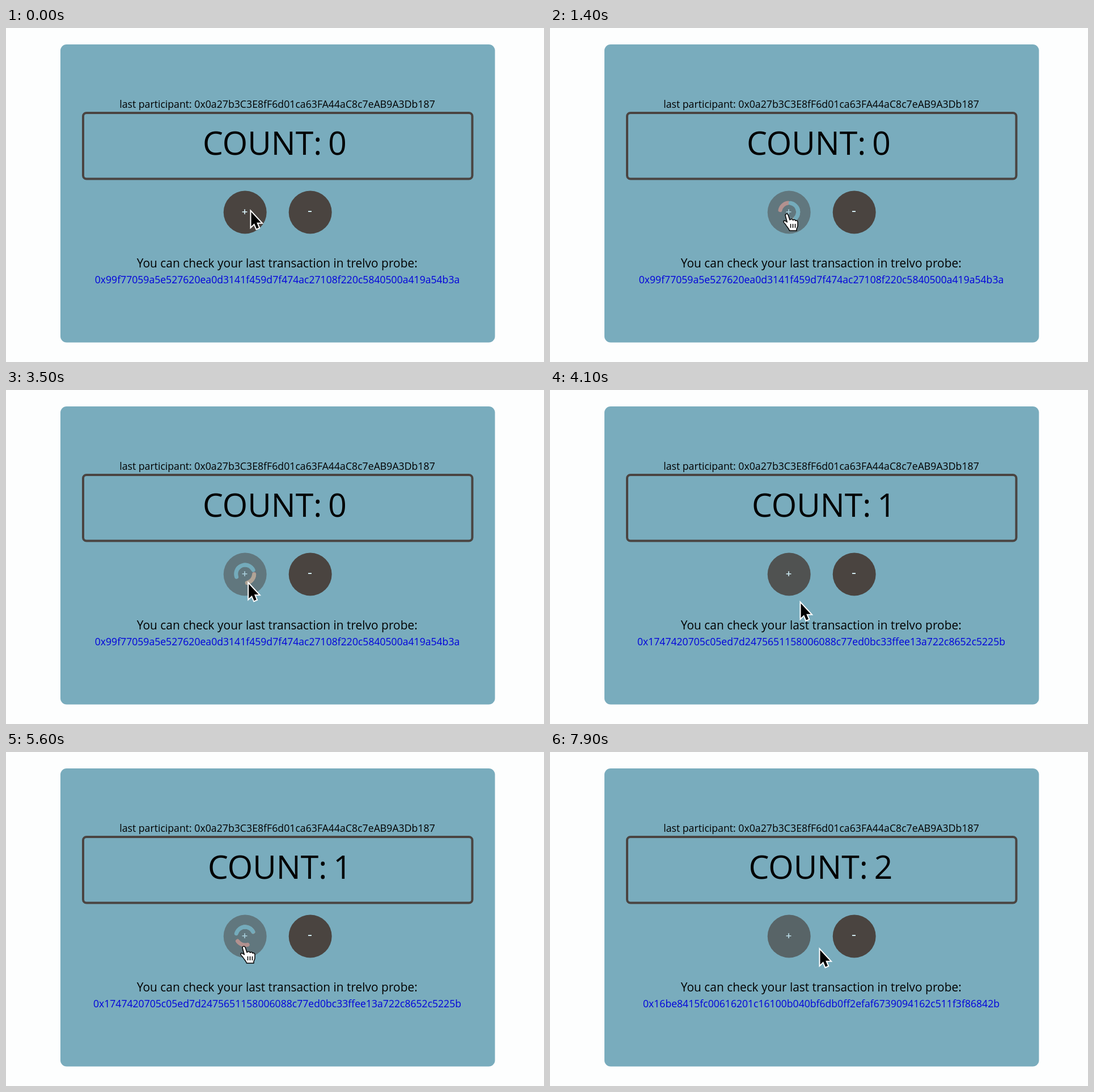
An HTML page for the animation above (8000 ms loop, 949x590 px).

```html
<!DOCTYPE html>
<html lang="en">
<head>
<meta charset="utf-8">
<title>Counter</title>
<style>
  html, body { margin: 0; width: 100%; height: 100%; overflow: hidden; background: #fdfefe; }
  svg { display: block; width: 100vw; height: 100vh; }
  text { font-family: "Open Sans", "Noto Sans", sans-serif; text-anchor: middle; }
  #count { text-anchor: start; word-spacing: -4px; }
  .sign { fill: #d9f3fa; }
  .arc { fill: none; stroke-width: 7; stroke-linecap: round; }
</style>
</head>
<body>
<svg viewBox="0 0 949 590" preserveAspectRatio="none">
  <rect x="96" y="29" width="766.5" height="526.5" rx="11" fill="#79acbd"/>
  <text x="478.5" y="141" font-size="17.7">last participant: 0x0a27b3C3E8fF6d01ca63FA44aC8c7eAB9A3Db187</text>
  <rect x="136" y="150" width="686.5" height="116.5" rx="6" fill="none" stroke="#4a4441" stroke-width="4"/>
  <text id="count" y="224" font-size="57"></text>

  <g id="plus">
    <circle cx="421.7" cy="325.5" r="38" fill="#4a4440"/>
    <text class="sign" x="421" y="331" font-size="18.5" font-weight="600">+</text>
  </g>
  <circle cx="536.7" cy="325.5" r="38" fill="#4a4440"/>
  <text class="sign" x="536" y="330.5" font-size="25">-</text>
  <g id="spinner" transform="translate(421.7 325)"></g>

  <text x="478.3" y="422.5" font-size="20.9">You can check your last transaction in trelvo probe:</text>
  <text id="hash" x="478.5" y="451" font-size="17.6" fill="#0000dc"></text>

  <g id="cursor">
    <path id="arrow" d="M.5 0V25.5L6 20.3L10 29.5L14 27.7L10.2 18.7H17.8Z"
      fill="#000" stroke="#fff" stroke-width="4" paint-order="stroke"/>
    <g id="hand" stroke="#000" stroke-width="1.5" stroke-linejoin="round">
      <path fill="#fff" d="M-2.8 3.5C-3.5 0 1 -1 2.2 2.5L5 11C7 9 10 9 10.5 11.5C12 9.8 15 10 15 12.5C17 11.5 19 12.5 19 15V21C19 24 17.5 25 17 27V30H4.5C3.5 26-.5 23-2.5 19C-4.5 17-7 15-5.8 13C-4.5 11.5-1.5 13 .3 15Z"/>
      <path d="M6.5 18v7M10.5 18v7M14.5 18v7"/>
    </g>
  </g>
</svg>
<script>
const LOOP = 8000, STEP = 100;
const PINK = '#b2918f', ORANGE = '#b0a496', TEAL = '#74abbb';
const $ = id => document.getElementById(id);

const states = [
  { from: 0, count: 0, x: 347, hash: '0x99f77059a5e527620ea0d3141f459d7f474ac27108f220c5840500a419a54b3a' },
  { from: 3900, count: 1, x: 356, hash: '0x1747420705c05ed7d2475651158006088c77ed0bc33ffee13a722c8652c5225b' },
  { from: 7800, count: 2, x: 350.5, hash: '0x16be8415fc00616201c16100b040bf6db0ff2efaf6739094162c511f3f86842b' }
];

// arcs: colour, angle at time "ref", degrees per second
const loads = [
  { begin: 800, end: 3900, ref: 1400, arcs: [
    [PINK, 228, 252], [ORANGE, 18, 354], [TEAL, 315, 458], [TEAL, 5, 631], [TEAL, 10, 823]] },
  { begin: 4500, end: 7800, ref: 4800, arcs: [
    [PINK, 180, 362], [ORANGE, 325, 415], [TEAL, 260, 415], [TEAL, 120, 670], [TEAL, 118, 642]] }
];

// time, x, y of the pointer's tip
const path = [
  [0, 432, 325], [400, 418, 328], [2200, 418, 328], [2600, 420, 324], [3300, 420, 324],
  [3800, 442, 377], [4200, 442, 377], [4600, 420, 343], [7200, 420, 343], [7900, 476, 350], [8000, 476, 350]
];
const handTimes = [[300, 2300], [4400, 7600]];

const arcs = loads[0].arcs.map(() => {
  const arc = document.createElementNS('http://www.w3.org/2000/svg', 'path');
  const c = 16 * Math.cos(Math.PI / 5), s = 16 * Math.sin(Math.PI / 5);
  arc.setAttribute('d', `M${c} ${-s}A16 16 0 0 1 ${c} ${s}`);
  arc.setAttribute('class', 'arc');
  return $('spinner').appendChild(arc);
});

const clamp = v => Math.max(0, Math.min(1, v));
const ease = v => v * v * (3 - 2 * v);

function pointerAt(t) {
  const i = Math.max(1, path.findIndex(p => p[0] > t));
  const [a, b] = [path[i - 1], path[i]];
  const k = ease(clamp((t - a[0]) / (b[0] - a[0])));
  return [a[1] + (b[1] - a[1]) * k, a[2] + (b[2] - a[2]) * k];
}

function buttonOpacity(t) {
  return loads.reduce((o, { begin, end }) => {
    if (t < begin) return o;
    return t < end ? 1 - 0.5 * clamp((t - begin) / 300) : clamp(0.5 + (t - end) / 550);
  }, 1);
}

function draw(time) {
  let t = Math.floor(time % LOOP / STEP) * STEP;
  if (t > 7200 && t < 7500) t = 7200;

  const state = states.filter(s => t >= s.from).pop();
  $('count').textContent = `COUNT: ${state.count}`;
  $('count').setAttribute('x', state.x);
  $('hash').textContent = state.hash;
  $('plus').setAttribute('opacity', buttonOpacity(t));

  const load = loads.find(l => t >= l.begin && t < l.end);
  $('spinner').style.display = load ? '' : 'none';
  if (load) load.arcs.forEach(([color, angle, speed], i) => {
    arcs[i].setAttribute('stroke', color);
    arcs[i].setAttribute('transform', `rotate(${angle + speed * (t - load.ref) / 1000})`);
  });

  const isHand = handTimes.some(([a, b]) => t >= a && t < b);
  $('hand').style.display = isHand ? '' : 'none';
  $('arrow').style.display = isHand ? 'none' : '';
  $('cursor').setAttribute('transform', `translate(${pointerAt(t)})`);
}

const start = performance.now();
function tick() {
  draw(performance.now() - start);
  requestAnimationFrame(tick);
}
tick();
</script>
</body>
</html>
```
